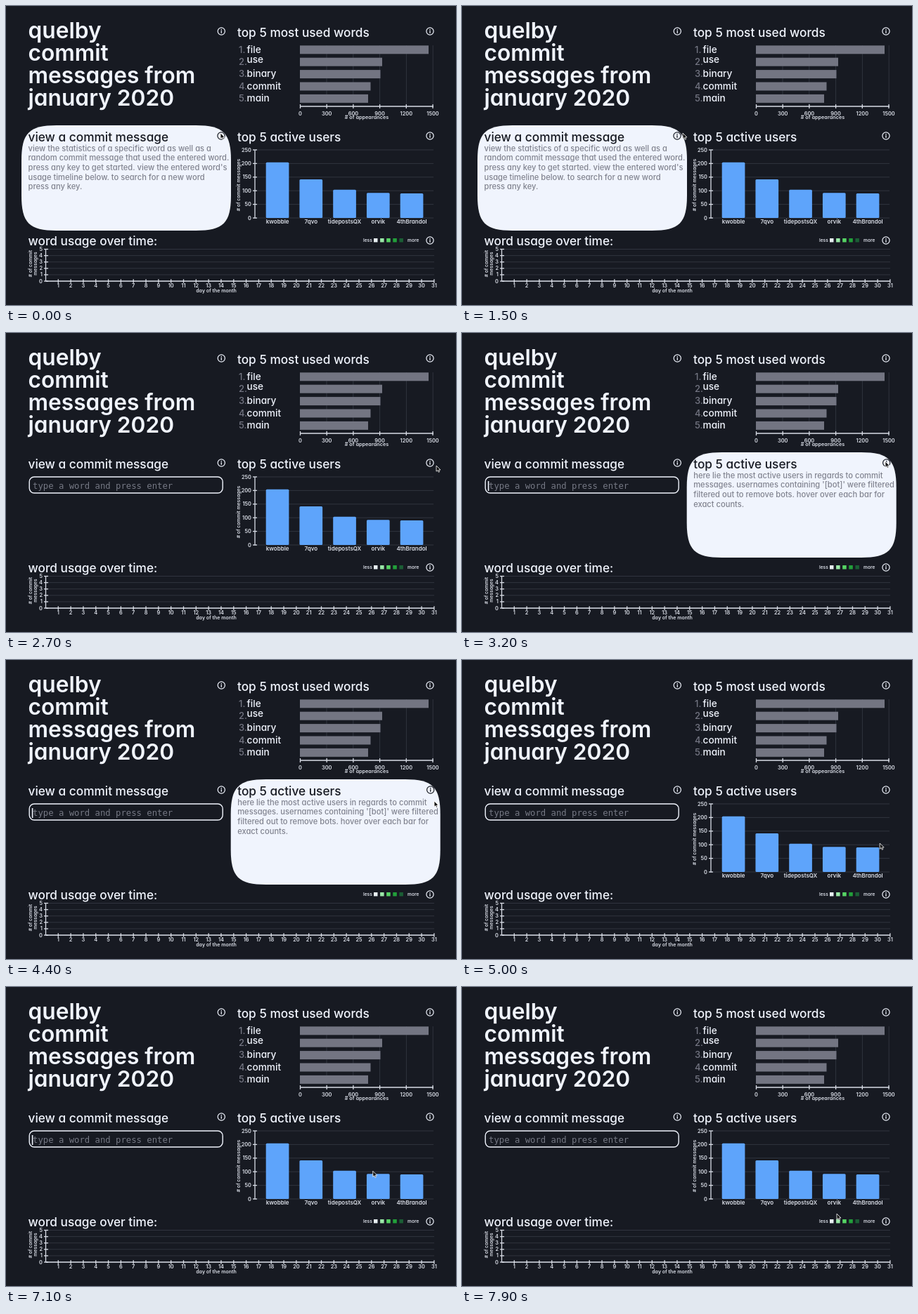
An HTML page that plays this animation: 640 px wide and 426 px high, repeating every 8 s.

```html
<!DOCTYPE html>
<html lang="en">
<head>
<meta charset="utf-8">
<title>commit dashboard</title>
<style>
  html, body { margin: 0; width: 640px; height: 426px; overflow: hidden; background: #171a22; }
  svg { display: block; }
  text { font-family: Inter, sans-serif; font-weight: 500; font-feature-settings: "cv11"; white-space: pre; }
</style>
</head>
<body>
<svg id="stage" width="640" height="426" viewBox="0 0 640 426"></svg>
<script>
const BG = '#171a22', FG = '#f0f4fd', AXIS = '#d9dde6', GRID = '#30343e', MUTED = '#737582';

const text = (x, y, s, size, { fill = FG, anchor = 'start', weight = 500, more = '' } = {}) =>
  `<text x="${x}" y="${y}" font-size="${size}" fill="${fill}" text-anchor="${anchor}" style="font-weight:${weight}" ${more}>${s}</text>`;
const small = (x, y, s, anchor = 'middle', size = 7.4, more = '') =>
  text(x, y, s, size, { fill: AXIS, anchor, weight: 600, more });
const vertical = (x, y, s, size) => small(x, y, s, 'middle', size, `transform="rotate(-90 ${x} ${y})"`);
const line = (x1, y1, x2, y2, color = AXIS, width = 1.3) =>
  `<path d="M${x1} ${y1}L${x2} ${y2}" stroke="${color}" stroke-width="${width}"/>`;
const rect = (x, y, w, h, fill, rx = 0, more = '') =>
  `<rect x="${x}" y="${y}" width="${w}" height="${h}" fill="${fill}" rx="${rx}" ${more}/>`;
const each = (list, fn) => list.map(fn).join('');
const range = n => [...Array(n).keys()];
const info = (x, y, color = FG) =>
  `<circle cx="${x}" cy="${y}" r="5.1" fill="none" stroke="${color}" stroke-width="1.2"/>` +
  line(x, y - 0.8, x, y + 2.7, color) + line(x, y - 2.9, x, y - 1.6, color);
const heading = (x, y, s, fill = FG) => text(x, y, s, 17.25, { fill });

// Rectangle with long, smooth corners
function squircle(x, y, w, h, r = 50, k = 11) {
  const s = w - 2 * r, v = h - 2 * r, b = r - k;
  return `<path fill="${FG}" d="M${x + r} ${y}h${s}c${b} 0 ${r} ${k} ${r} ${r}v${v}c0 ${b} ${-k} ${r} ${-r} ${r}` +
    `h${-s}c${-b} 0 ${-r} ${-k} ${-r} ${-r}v${-v}c0 ${-b} ${k} ${-r} ${r} ${-r}z"/>`;
}

function card(id, x, title, rows) {
  return `<g id="${id}">` + squircle(x, 170, 298, 150) +
    heading(x + 9.5, 192.5, title, BG) + info(x + 284, 185, BG) +
    each(rows, (s, i) => text(x + 9.5, 206.7 + 13.6 * i, s, 11.15, { fill: '#80838f' })) + '</g>';
}

function wordChart() {
  const words = ['file', 'use', 'binary', 'commit', 'main'];
  const ends = [601, 535, 532.5, 518.5, 515];
  return heading(329, 44, 'top 5 most used words') + info(603, 36) +
    each(range(5), i => line(456 + 37.8 * i, 56, 456 + 37.8 * i, 143, GRID, 1)) +
    each(words, (w, i) => {
      const y = 66.5 + 17.4 * i;
      return text(331, y, i + 1 + '.', 13, { fill: MUTED }) +
        text(342.5, i === 1 ? 80.5 : y, w, 13.7) +
        rect(418, 56.3 + 17.4 * i, ends[i] - 418, 12, MUTED);
    }) +
    line(418, 143, 608, 143) +
    each(range(6), i => {
      const x = 418.5 + 37.7 * i;
      return line(x, 140, x, 146) + small(x, 155.5, 300 * i);
    }) +
    small(513, 161, '# of appearances', 'middle', 7.3);
}

const users = [['kwobble', 204], ['7qvo', 142], ['tidepostsQX', 104], ['orvik', 92], ['4thBrandol', 90]];
const bars = users.map(([name, count], i) =>
  ({ name, count, x: 369.7 + 47.75 * i, y: 302 - count * 0.388, w: 32.7 }));

function userChart() {
  return heading(329, 193, 'top 5 active users') + info(603, 185) +
    each(range(6), i => {
      const y = 302 - 19.4 * i;
      return line(354, y, 608, y, GRID, 1) + line(351, y, 357, y) + small(349, y + 2.5, 50 * i, 'end');
    }) +
    line(354, 205, 354, 302.5) + vertical(333, 255, '# of commit messages', 6.8) +
    each(bars, b => rect(b.x, b.y, b.w, 302 - b.y, '#5ea4fb', 1.5) +
      small(b.x + b.w / 2, 310.3, b.name, 'middle', 8));
}

function timeline() {
  const shades = ['#e8f0f3', '#9be9a8', '#56d364', '#22a03a', '#1b5e35'];
  return heading(31.5, 341, 'word usage over time:') + info(603, 334) +
    small(508, 336, 'less', 'start', 6.6) + small(571, 336, 'more', 'start', 6.6) +
    each(shades, (c, i) => rect(523 + 9.1 * i, 331, 5.5, 5.5, c)) +
    each(range(6), i => {
      const y = 392 - 9.1 * i;
      return line(57, y, 609, y, GRID, 1) + line(54, y, 60, y) + small(52, y + 2.5, i, 'end');
    }) +
    line(56.5, 346.5, 56.5, 392) + line(56.5, 392, 609, 392) +
    each(range(31), i => {
      const x = 74.3 + 17.82 * i;
      return line(x, 389.3, x, 394.7) + small(x, 400.5, i + 1);
    }) +
    small(299, 408.3, 'day of the month', 'middle', 7) +
    vertical(37, 367, '# of commit', 6.7) + vertical(43.5, 367, 'messages', 6.7);
}

const stage = document.getElementById('stage');
stage.innerHTML =
  each(['quelby', 'commit', 'messages from', 'january 2020'],
    (s, i) => text(31.5, 46 + 32 * i, s, 31.7, { weight: 600 })) +
  info(306.3, 36) + wordChart() + userChart() +
  `<g id="hover">${rect(0, 0, bars[0].w, 0, 'none', 1, 'stroke="#fff" stroke-width="1.6"')}${small(0, 0, '', 'middle', 9)}</g>` +
  timeline() +
  heading(31.5, 192.5, 'view a commit message') + info(306.3, 185) +
  rect(33.2, 205, 275, 23, 'none', 7, `stroke="${FG}" stroke-width="1.4"`) +
  `<text x="38" y="222" font-size="12.25" fill="#767985" style="font-family:'DejaVu Sans Mono',monospace;font-weight:400">type a word and press enter</text>` +
  rect(36.8, 211, 1.6, 14, FG, 0, 'id="caret"') +
  card('messageCard', 22, 'view a commit message', [
    'view the statistics of a specific word as well as a',
    'random commit message that used the entered word.',
    'press any key to get started. view the entered word\'s',
    'usage timeline below. to search for a new word',
    'press any key.']) +
  card('userCard', 319.7, 'top 5 active users', [
    'here lie the most active users in regards to commit',
    'messages. usernames containing \'[bot]\' were filtered',
    'filtered out to remove bots. hover over each bar for',
    'exact counts.']) +
  '<path id="cursor" d="M0 0V8.2L1.9 6.5L3.2 9.3L4.6 8.7L3.4 6H6Z" fill="#111" stroke="#fff" stroke-width=".8"/>';

// Pointer path: time, x, y
const path = [
  [0, 305, 181], [1400, 305, 181], [1500, 314, 181], [1800, 506, 155], [2000, 560, 160],
  [2500, 601, 183], [2600, 601, 183], [2700, 612, 189], [2800, 602, 183], [4300, 602, 183],
  [4400, 609, 201], [4700, 629, 225], [5200, 571, 285], [5300, 452, 285], [5400, 452, 285],
  [5700, 575, 285], [5900, 575, 285], [6100, 500, 285], [6200, 500, 285], [6300, 465.5, 285],
  [6900, 505, 285], [7000, 505, 285], [7400, 572, 194], [7900, 533, 323]];

function pointerAt(t) {
  const next = path.findIndex(p => p[0] > t);
  if (next < 0) return path.at(-1).slice(1);
  const [t0, x0, y0] = path[next - 1], [t1, x1, y1] = path[next];
  const k = (t - t0) / (t1 - t0);
  return [x0 + (x1 - x0) * k, y0 + (y1 - y0) * k];
}

const [messageCard, userCard, caret, cursor, hover] =
  ['messageCard', 'userCard', 'caret', 'cursor', 'hover'].map(id => document.getElementById(id));
const show = (el, on) => el.setAttribute('visibility', on ? 'visible' : 'hidden');
const set = (el, attrs) => Object.entries(attrs).forEach(([k, v]) => el.setAttribute(k, v));

function draw(now) {
  const t = Math.floor(now % 8000 / 100) * 100;
  const [x, y] = pointerAt(t);
  set(cursor, { transform: `translate(${x} ${y})` });
  show(messageCard, t < 1600);
  show(userCard, t === 2600 || (t >= 2900 && t < 4500));
  show(caret, Math.floor((t + 400) / 500) % 2 === 1);

  const bar = bars.find(b => x >= b.x && x <= b.x + b.w && y >= b.y && y <= 302);
  show(hover, bar);
  if (bar) {
    const [box, label] = hover.children;
    set(box, { x: bar.x, y: bar.y, height: 302.5 - bar.y });
    set(label, { x: bar.x + bar.w / 2, y: bar.y - 2.5 });
    label.textContent = bar.count;
  }
  requestAnimationFrame(draw);
}
requestAnimationFrame(draw);
</script>
</body>
</html>
```
